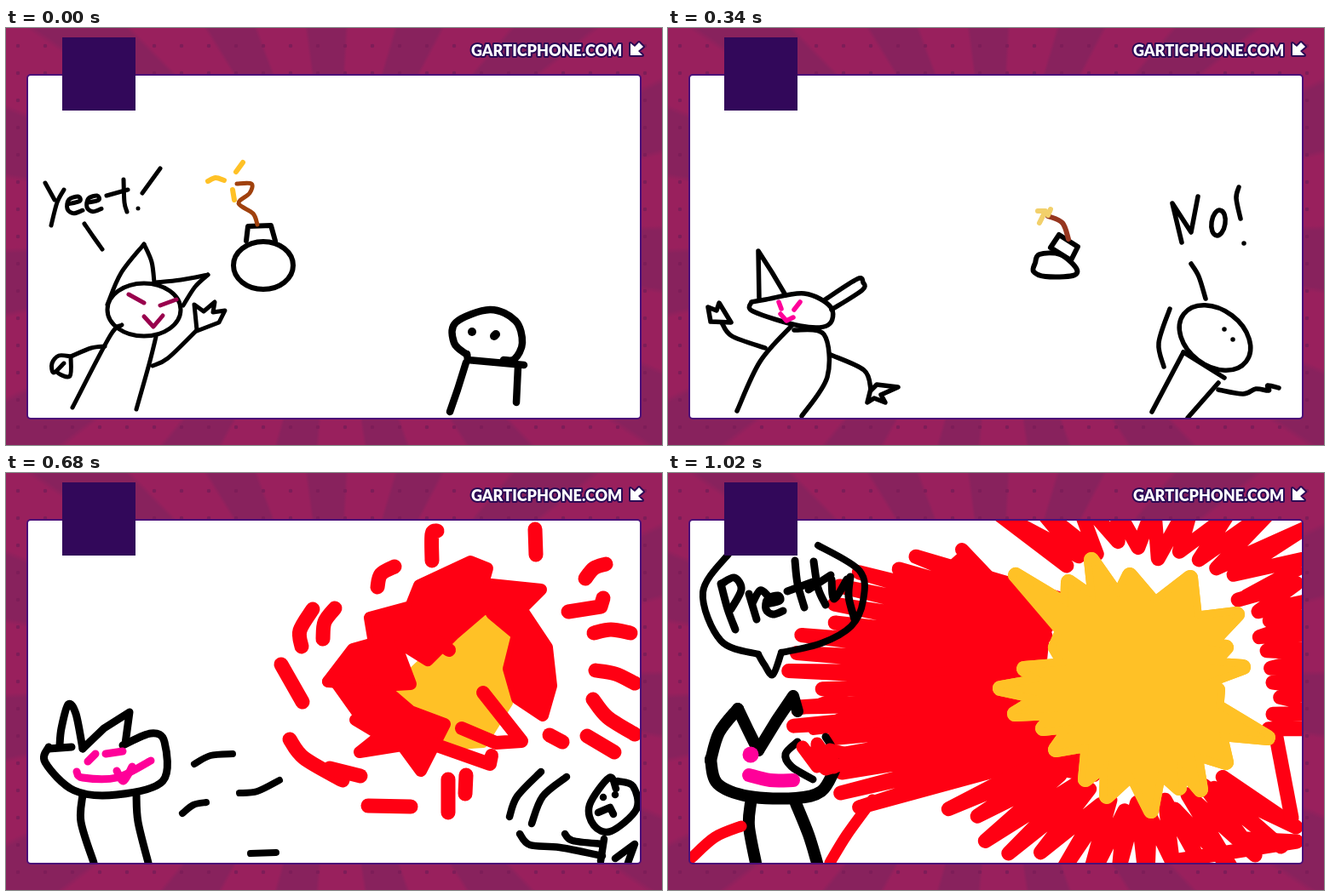
Animation, 770 px wide and 490 px high, one loop 1.19 s. Source, as an HTML page with a canvas:

```html
<!DOCTYPE html>
<html lang="en">
<head>
<meta charset="utf-8">
<title>Bomb toss</title>
<style>
html, body { margin: 0; width: 100%; height: 100%; overflow: hidden; }
body { position: relative; background:
  radial-gradient(circle at 14px 21px, #7d1d58 2px, transparent 2.6px) 0 0 / 32px 32px,
  repeating-conic-gradient(from 4deg at 50% 50%, #99205d 0 12deg, #88225d 13deg 23deg, #99205d 24deg); }
canvas, svg { position: absolute; left: 0; top: 0; display: block; }
.url { font: 900 18px Lato, "Open Sans", sans-serif; fill: #fff; }
.rim { stroke: #2b0a55; stroke-width: 4px; stroke-linejoin: round; paint-order: stroke; }
</style>
</head>
<body>
<canvas width="770" height="490"></canvas>
<svg width="770" height="490">
  <rect x="25" y="55" width="720" height="404" rx="4" fill="none" stroke="#4b0f78" stroke-width="2"/>
  <rect x="66" y="11" width="86" height="86" fill="#32085a"/>
  <text class="url rim" x="546" y="33">GARTICPHONE.COM</text>
  <path class="rim" d="M733 18V32H747L742 27L748 22L743 17L738 22Z" fill="#fff"/>
</svg>
<script>
const STEP = 170;
const ink = '#000', red = '#ff0013', amber = '#ffc126', pink = '#ff0099', plum = '#99004d',
  rust = '#a0410d', orange = '#ff7826', blood = '#a80a10', grey = '#aaa';
const c = document.querySelector('canvas').getContext('2d');

const pen = (color, width) => {
  c.strokeStyle = c.fillStyle = color;
  c.lineWidth = width;
};
const points = s => {
  const n = s.split(' ').map(Number);
  return n.flatMap((v, i) => i % 2 ? [] : [[v, n[i + 1]]]);
};
const trace = p => {
  c.beginPath();
  p.forEach(([x, y]) => c.lineTo(x, y));
  if (p.length < 2) c.lineTo(p[0][0] + .01, p[0][1]);
  c.stroke();
};
const line = (...strokes) => strokes.forEach(s => trace(points(s)));
const solid = s => { line(s); c.fill(); };

// Rounded line through every point
const curve = p => {
  c.beginPath();
  c.moveTo(...p[0]);
  p.slice(1).forEach((b, i) => {
    const a = p[i], before = p[i - 1] || a, after = p[i + 2] || b;
    c.bezierCurveTo(...a.map((v, k) => v + (b[k] - before[k]) / 6),
      ...b.map((v, k) => v - (after[k] - a[k]) / 6), ...b);
  });
  c.stroke();
};
const soft = (...strokes) => strokes.forEach(s => curve(points(s)));

const oval = (x, y, rx, ry, turn = 0) => {
  c.beginPath();
  c.ellipse(x, y, rx, ry, turn, 0, 7);
  c.stroke();
};
const letterE = (x, y, s) =>
  curve([[0, .5], [.8, .3], [.7, 0], [.1, .2], [0, .8], [.4, 1.1], [1, .9]].map(([u, v]) => [x + u * s, y + v * s]));

// Filled star whose edge falls back towards the centre between tips
const burst = (cx, cy, depth, s) => {
  const p = points(s);
  trace(p.flatMap((a, i) => {
    const b = p[(i + 1) % p.length];
    return [a, [cx + ((a[0] + b[0]) / 2 - cx) * depth, cy + ((a[1] + b[1]) / 2 - cy) * depth]];
  }));
  c.closePath();
  c.stroke();
  c.fill();
};

// Zigzag scribble between two ellipses, angles in degrees
const scribble = (cx, cy, from, to, count, inner, outer, tall, seed) => {
  const rnd = () => (seed = (seed * 16807) % 2147483647) / 2147483647;
  const p = [];
  for (let i = 0; i <= count * 2; i++) {
    const a = (from + (to - from) * i / count / 2) * Math.PI / 180;
    const k = .88 + .15 * rnd();
    const [rx, ry] = i % 2 ? [outer * k, tall * k] : [inner, inner].map(r => r * (.95 + .15 * rnd()));
    p.push([cx + rx * Math.cos(a), cy + ry * Math.sin(a)]);
  }
  trace(p);
};

function windup() {
  pen(ink, 5);
  line('46 182 57 202', '181 165 160 194', '155 212', '118 197 143 190');
  soft('68 190 60 205 53 232', '138 178 139 205 142 216', '92 230 103 246 113 260');
  letterE(72, 198, 18);
  letterE(95, 197, 17);
  oval(162, 331, 43, 31);
  soft('119 325 135 288 162 254', '162 254 171 275 174 299', '176 299 205 296 237 290', '237 290 222 304 208 326');
  soft('136 349 122 362 78 446', '176 363 168 395 153 448', '116 374 100 376 76 386', '172 397 190 388 224 355');
  soft('76 386 75 409 60 404 68 394 56 405 54 394 62 385 76 386');
  line('224 355 221 325 232 333 245 322 243 334 257 332 250 346 224 356');
  pen(plum, 5);
  line('144 313 162 323', '181 326 200 319', '162 339 173 351 184 338');
  pen(ink, 6);
  oval(302, 279, 35, 28);
  line('282 250 284 233 311 232 316 250');
  pen(rust, 5);
  soft('271 183 288 183 286 194 273 206 290 218 295 231');
  pen(amber, 6);
  soft('237 180 246 176 256 179', '270 169 278 158', '266 190 268 202');
  pen(ink, 8.5);
  soft('541 384 526 370 528 346 568 331 598 344 606 370 597 389 584 390');
  line('541 383 542 390 608 396', '540 393 530 425 521 451', '601 398 599 440');
  pen(ink, 10);
  line('547 357', '573 362 575 360');
}

function flight() {
  pen(ink, 5);
  line('50 176 52 206', '129 190 159 198', '148 174 145 225', '167 231');
  soft('71 195 60 212 52 233', '197 170 185 190 175 216', '98 232 104 254');
  letterE(75, 199, 17);
  soft('94 214 112 208 110 198 98 202 96 225 108 224');
  oval(175, 329, 38, 25);
  soft('141 312 144 285 156 260', '156 260 175 285 182 311', '206 309 225 298 253 291', '253 291 245 307 215 331');
  soft('146 349 120 370 90 408 80 444', '146 354 165 358 191 362', '191 362 183 425 160 452', '190 386 215 386 242 368');
  line('110 374 74 374 66 384', '62 376 66 384 73 386 70 402 40 398 51 375 57 386 62 380');
  line('242 367 240 344 255 354 276 346 273 353 290 361 245 364');
  pen(pink, 5);
  line('156 317 180 330', '187 331 203 326', '167 339 175 351 188 338');
  pen(grey, 6);
  soft('288 257 315 246 364 245', '285 277 315 264 364 262', '291 300 340 274 370 272');
  pen(ink, 6);
  soft('391 257 381 278 388 297 425 295 432 275 422 256 391 257');
  line('389 256 391 237 418 235 425 265');
  pen(rust, 5);
  soft('380 199 389 203 393 222 404 233');
  pen(amber, 6);
  line('363 184 376 189 368 202 379 201');
  pen(ink, 5.5);
  soft('541 392 529 370 541 341 575 329 612 340 619 368 608 393 590 394');
  line('537 392 600 393', '536 394 521 453', '600 394 603 457', '549 361', '572 361');
  soft('410 373 420 373 441 385 465 364 487 408 500 398 532 417');
  line('605 416 614 393 621 400 652 361 672 364 680 337 692 343 710 336');
  oval(585, 241, 6, 8);
  oval(680, 249, 7, 13);
  soft('602 207 604 250', '603 238 610 232 613 249', '641 227 643 255', '643 240 655 233 660 255');
  line('704 206 703 242', '705 257', '638 272 615 301');
}

function drop() {
  pen(ink, 5.5);
  line('603 252 592 206 614 240 622 198', '676 253');
  oval(646, 229, 8, 15, .15);
  soft('670 187 667 200 672 224', '614 277 623 292 631 318');
  line('107 318 106 262 122 287 138 314');
  soft('183 320 222 295 229 299 228 308 192 331');
  soft('98 322 100 333 155 350 188 349 191 328 160 312 115 319 98 322');
  soft('145 350 108 392 81 450', '148 355 183 360 187 410 157 456', '63 346 75 362 114 376', '191 384 230 402 238 424');
  line('50 345 47 328 57 332 60 323 74 346 50 345', '238 424 234 440 242 435 255 440 250 431 270 422 245 419 238 426');
  pen(pink, 5.5);
  line('130 322 133 330', '155 322 148 331', '132 336 139 344 147 340');
  pen(ink, 6);
  soft('431 276 429 286 443 292 475 291 479 282 460 266 436 266 431 276');
  line('449 258 459 243 481 257 473 273 449 258');
  pen('#96361f', 6);
  soft('446 221 463 229 470 248');
  pen('#f2d06b', 6);
  line('434 215 443 215 436 229', '449 213 446 220');
  pen(ink, 5.5);
  oval(642, 364, 46, 33, .65);
  line('605 381 653 411', '605 381 568 451', '646 417 610 458', '653 354', '663 366');
  soft('589 330 576 370 582 398', '646 425 675 430 690 424 705 426 704 420 717 423');
}

function bang() {
  pen(ink, 5);
  soft('105 314 104 264 115 276 134 304', '189 311 210 298 233 290', '233 290 222 308 198 326');
  soft('102 322 97 335 110 350 180 352 196 342 194 322 135 312 102 322', '124 355 95 369 62 328');
  line('46 316 50 327 60 331 64 309 57 312 46 318');
  soft('124 357 108 400 132 458', '175 360 190 390 233 458', '178 358 235 366 253 416');
  line('255 410 250 432 260 421 281 429 285 418 280 412 302 407 280 403 257 412');
  line('222 345 268 338', '277 375 338 353', '210 395 236 386', '285 445 317 432');
  pen(pink, 5);
  line('120 305 130 313', '157 309 143 316', '125 319 126 330 131 331', '147 321 148 331', '125 342 150 343 158 334');
  pen(amber, 14);
  line('465 255 485 300 510 255 492 312 468 235 490 220', '500 258 550 305 575 280 600 295');
  line('555 230 600 225 556 245 600 255 556 260 598 275', '510 200 540 215 590 203');
  pen(amber, 5);
  line('460 198 441 232');
  pen(red, 14);
  line('413 154 437 154 456 186 500 148 508 172 612 116 612 158 672 182 630 240 655 243 630 265 648 275 622 290');
  line('622 290 610 312 580 305 560 345 535 327 520 338 477 342 485 318', '690 188 672 182', '455 308 412 308 400 282');
  line('362 236 400 256 440 258', '380 240 437 240 418 205 435 195 432 155');
  pen(orange, 16);
  line('400 286 455 298 488 312 500 290 530 310 545 300 552 313 575 288 595 290 632 222');
  line('632 222 572 205 575 177 530 192 518 181 500 208 468 208 485 235 475 248 453 237 450 260 412 266 455 270');
  pen(red, 12);
  line('549 73 554 78', '462 107 474 105', '393 113 393 118', '582 119', '348 156 373 156', '339 168');
  line('321 182 310 192 307 207', '375 205 393 196', '320 229 338 249', '356 283 352 295', '390 322 413 339');
  line('435 361 430 374', '449 385 483 380', '521 383 532 381', '659 112 704 110', '666 310 679 283', '687 270 701 258', '730 237 732 245');
  pen(ink, 5);
  oval(669, 382, 43, 29, .1);
  soft('601 316 613 340 624 363', '581 379 630 409 683 418');
  line('655 412 612 458', '683 418 698 416 689 435 687 458', '686 396 697 393 705 400', '710 370 706 382');
  pen(ink, 10);
  line('682 378', '702 377');
}

function fireball() {
  pen(ink, 9);
  soft('50 322 46 340 80 373 130 378 184 362 186 316 170 306 137 320', '63 320 65 300 73 272 82 283 90 324');
  line('50 324 77 322', '90 324 115 300 145 281 140 318');
  soft('90 378 88 410 103 458', '153 378 155 410 167 458');
  pen(ink, 8);
  soft('221 342 240 332 266 330', '207 400 220 390 235 387', '274 376 295 374 321 361', '287 447 317 446');
  pen(pink, 9);
  soft('96 339 105 330', '117 330 137 327', '83 351 90 358 130 358 170 338', '130 350 138 362 148 345');
  pen(amber, 10);
  solid('470 240 550 165 595 180 590 270 560 318 530 320 445 265');
  pen(red, 14);
  solid('378 245 407 207 432 200 427 170 475 157 485 132 545 104 565 112 560 130 628 137 605 160 560 160 525 190 495 220 455 195 475 248 440 250');
  solid('605 160 635 205 640 250 630 285 600 265 590 230 600 190 570 165');
  solid('378 245 440 250 475 280 515 295 487 350 465 320 415 328 440 308 410 290');
  pen(red, 16);
  line('560 258 605 315 575 317 535 300', '500 318 568 342 570 332', '487 185 520 208');
  pen(red, 17);
  soft('500 103 500 72 506 68', '621 66 622 96', '436 134 440 119 456 110', '680 124 690 112 704 107', '690 188 710 184 733 188');
  soft('692 232 715 236 738 247', '689 266 706 287 738 307', '347 204 345 185 360 160', '372 195 374 175 386 159', '333 313 350 335 395 361');
  line('660 163 698 157 701 147', '682 309 714 328', '323 225 348 269', '380 347 416 356', '425 391 475 392', '519 360 519 399', '540 355 539 377', '638 308 653 316');
  pen(ink, 8.5);
  soft('591 404 600 380 628 351', '617 412 630 380 658 357', '716 371 708 358 685 390 690 414 710 421 740 395 736 368 718 362');
  soft('603 424 615 437 650 440 700 450', '656 424 665 432 700 436');
  line('702 430 698 456', '715 453 738 436 730 458', '695 399 709 393 713 401', '701 381', '715 378');
}

function blast() {
  pen(amber, 14);
  line('390 300 245 344 340 325');
  burst(560, 240, .86, '478 124 570 115 603 120 628 155 672 180 690 225 675 260 704 326 660 343 590 360 522 364 490 315 410 295 420 238 447 185');
  pen(red, 16);
  solid('300 68 460 56 468 150 432 175 435 205 408 235 355 260 405 275 340 305 230 320 320 260 220 245 310 205 200 180 310 150 250 120');
  pen(red, 17);
  scribble(560, 240, 226, 155, 17, 145, 425, 240, 7);
  line('190 328 430 300 258 350 450 292 285 400 460 320 312 438 465 325 335 455 475 340');
  scribble(558, 240, 136, 62, 11, 133, 310, 235, 5);
  scribble(562, 230, -112, -38, 9, 132, 330, 225, 11);
  scribble(560, 250, -36, 50, 10, 145, 270, 240, 23);
  pen(red, 9);
  soft('26 179 70 174 126 172', '42 145 85 162 135 180', '28 433 55 420 80 409', '242 397 188 458');
  pen(ink, 10);
  soft('55 323 52 345 90 378 150 380 188 350 184 315 145 310 122 325 121 342 135 357', '60 320 62 298 73 267 102 323');
  line('102 320 130 285 145 276 143 310');
  soft('90 385 92 420 102 458', '155 385 165 420 184 457');
  pen(ink, 19);
  line('147 326 152 325', '144 362 152 358');
  pen(pink, 9);
  line('93 329 94 341 102 328 101 338');
  soft('82 354 105 358 131 356');
  pen(blood, 9);
  line('140 341 152 337 172 342', '168 320 167 338 178 360');
  pen(ink, 9);
  oval(705, 400, 31, 31);
  c.fillStyle = '#fff';
  c.fill();
  pen(blood, 15);
  line('686 383 700 378 693 387');
  pen(ink, 8);
  line('628 406 690 434', '683 407 690 408', '713 402', '690 414 698 406 706 412');
  soft('700 430 695 445 685 458');
}

function pretty() {
  pen(red, 16);
  solid('345 90 440 190 430 290 500 355 440 345 290 330 200 345 290 300 230 234 360 190 300 130');
  pen(red, 17);
  scribble(555, 250, 226, 142, 17, 130, 405, 245, 9);
  scribble(555, 250, 142, 48, 15, 140, 320, 235, 3);
  scribble(555, 250, -124, -42, 10, 158, 340, 235, 17);
  scribble(555, 250, -40, 18, 9, 155, 250, 220, 31);
  line('712 300 732 405', '600 455 738 433 680 430');
  pen(amber, 18);
  burst(555, 250, .74, '408 120 470 128 497 102 542 120 613 123 668 166 655 205 675 228 645 255 704 311 655 340 625 372 600 370 567 397 515 380 490 360 455 325 440 300 407 283 390 253 418 230 455 205');
  pen(red, 10);
  soft('150 280 235 250 330 232');
  line('150 280 250 262 170 303 280 290');
  pen(ink, 14);
  soft('50 338 60 305 82 277', '82 277 93 300 106 326', '50 336 58 365 95 380 150 382 180 374 195 350');
  line('106 326 128 290 147 262 152 280');
  soft('97 388 95 415 103 458', '150 388 165 425 175 458');
  pen(ink, 9);
  soft('152 316 138 330 145 345 170 360', '185 310 196 330 193 350');
  pen(red, 15);
  line('158 322 175 345 175 318 195 346 190 325 230 335 185 348 165 330');
  pen(pink, 19);
  line('97 331');
  pen(pink, 16);
  soft('95 355 120 361 147 361');
  pen(red, 13);
  soft('28 452 55 428 86 415', '240 384 210 425 190 458');
  pen(ink, 8);
  soft('72 94 41 140 62 197 106 213', '106 213 113 225 123 237 133 211', '133 211 180 200 215 180 229 150 225 115 176 85');
  pen(ink, 9);
  soft('62 130 70 160 79 184', '63 130 78 123 86 137 74 160', '95 142 104 172', '99 153 108 138 117 144');
  letterE(115, 144, 20);
  soft('149 103 152 130 160 158', '140 139 170 128', '171 104 176 135 185 155', '165 137 191 120', '192 125 195 148 210 125', '214 122 212 145 219 172');
}

const scenes = [windup, flight, drop, bang, fireball, blast, pretty];
const start = performance.now();
let shown = -1;

c.lineCap = c.lineJoin = 'round';
c.beginPath();
c.rect(26, 56, 718, 402);
c.clip();

function tick() {
  const now = Math.floor((performance.now() - start) / STEP) % scenes.length;
  if (now !== shown) {
    c.fillStyle = '#fff';
    c.fillRect(26, 56, 718, 402);
    scenes[now]();
    shown = now;
  }
  requestAnimationFrame(tick);
}
tick();
</script>
</body>
</html>
```
